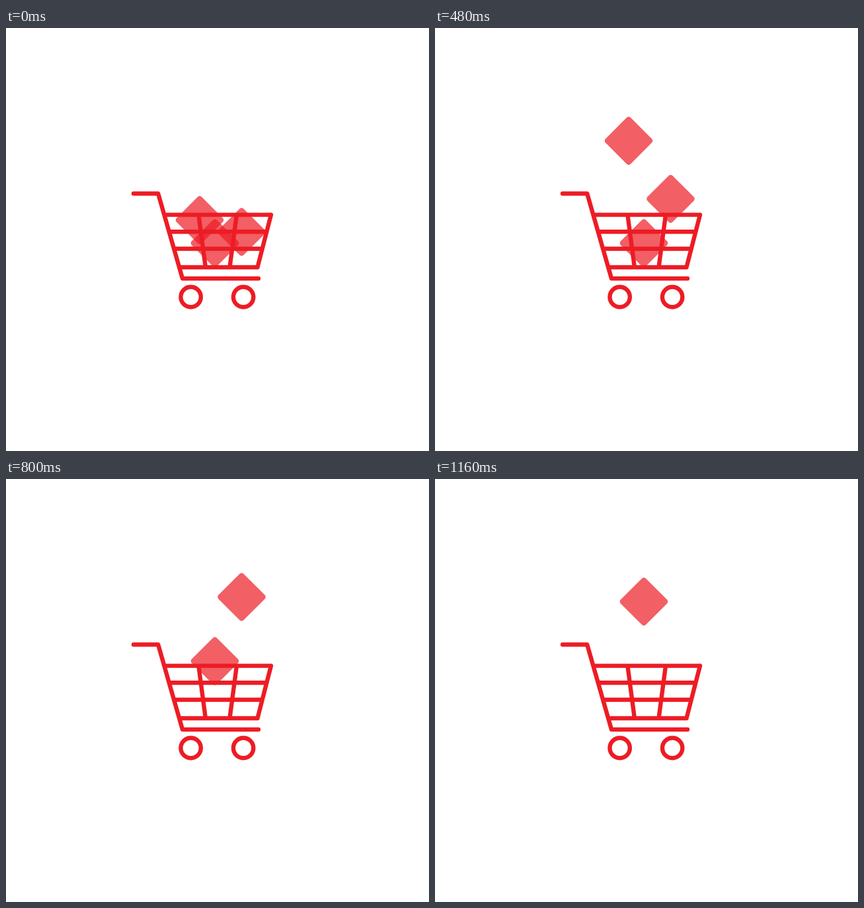
Recreate the animation shown at these times as an HTML page with a canvas. Size 640 by 640 pixels, loop 1.2 s.

```html
<!DOCTYPE html>
<html lang="en">
<head>
<meta charset="utf-8">
<title>Shopping cart</title>
<style>
  html, body { margin: 0; height: 100%; overflow: hidden; background: #fff; }
  canvas { display: block; width: 640px; height: 640px; }
</style>
</head>
<body>
<canvas id="stage" width="640" height="640"></canvas>
<script>
const ctx = document.getElementById('stage').getContext('2d');
const RED = '#ed1c24';
const STEP = 40, STEPS = 30, RISE = 10, LIFE = 15;
const SIDE = 53.8, RADIUS = 4.2;
const HANDLE = 250.5, RIM = 282.6, FLOOR = 362, RAIL = 379;
const MIDDLE = 320.2, ROW_GAP = 25.7;

// Resting centres, in the order the boxes leave the cart
const boxes = [
  { x: 293, y: 290.6 },
  { x: 356.5, y: 308.5 },
  { x: 316, y: 325.5 }
];

// Sloping edges of the cart: x at a given height
const backX = y => 230.2 + (y - HANDLE) * 0.2864;
const frontX = y => 401 - (y - RIM) * 0.258;

function line(x1, y1, x2, y2) {
  ctx.moveTo(x1, y1);
  ctx.lineTo(x2, y2);
}

function drawBox(x, y) {
  ctx.save();
  ctx.translate(x, y);
  ctx.rotate(Math.PI / 4);
  ctx.globalAlpha = 0.7;
  ctx.beginPath();
  ctx.roundRect(-SIDE / 2, -SIDE / 2, SIDE, SIDE, RADIUS);
  ctx.fill();
  ctx.restore();
}

function drawCart() {
  ctx.beginPath();
  line(193, HANDLE, backX(HANDLE), HANDLE);
  ctx.lineTo(backX(RAIL), RAIL);
  ctx.lineTo(382, RAIL);

  line(frontX(RIM), RIM, frontX(FLOOR), FLOOR);
  for (let i = 0; i < 4; i++) {
    const y = i < 3 ? RIM + i * ROW_GAP : FLOOR;
    line(backX(y), y, frontX(y), y);
  }

  for (const side of [-1, 1]) {
    line(MIDDLE + side * 28.8, RIM, MIDDLE + side * 18.3, FLOOR);
    const hub = 319.4 + side * 39.75;
    ctx.moveTo(hub + 15.2, 407);
    ctx.arc(hub, 407, 15.2, 0, Math.PI * 2);
  }
  ctx.stroke();
}

function draw(now) {
  const step = Math.floor(now / STEP) % STEPS;
  ctx.fillStyle = '#fff';
  ctx.fillRect(0, 0, 640, 640);
  ctx.fillStyle = ctx.strokeStyle = RED;
  ctx.lineWidth = 6.4;
  ctx.lineCap = ctx.lineJoin = 'round';
  boxes.forEach(({ x, y }, i) => {
    const age = step - Math.floor(i * LIFE / 2);
    if (age < LIFE) drawBox(x, y - RISE * Math.max(0, age));
  });
  drawCart();
}

let origin;
function tick(now) {
  origin ??= now;
  draw(now - origin);
  requestAnimationFrame(tick);
}
draw(0);
requestAnimationFrame(tick);
</script>
</body>
</html>
```
